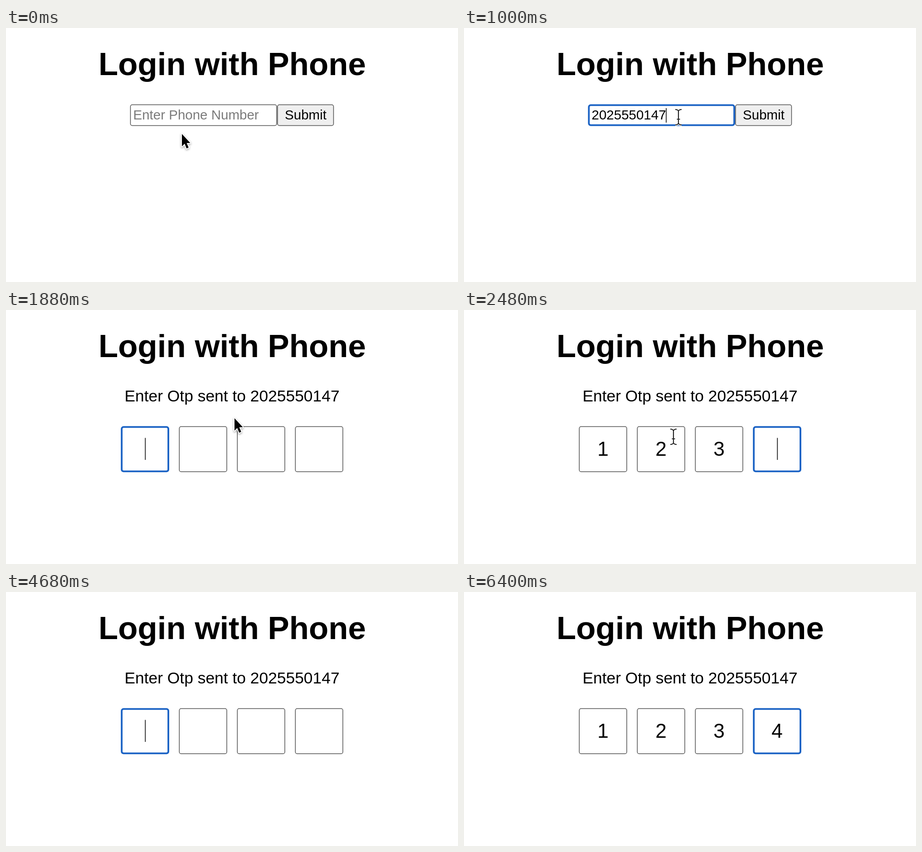
An HTML page with a canvas for the animation above (6560 ms loop, 997 px wide and 561 px high).

```html
<!DOCTYPE html>
<html lang="en">
<head>
<meta charset="utf-8">
<title>Login with Phone</title>
<style>
  html, body { margin: 0; width: 100%; height: 100%; overflow: hidden; background: #fff; }
  canvas { display: block; }
</style>
</head>
<body>
<canvas id="stage" width="997" height="561"></canvas>
<script>
const ctx = document.getElementById('stage').getContext('2d');
const LOOP = 6560, STEP = 40, BLINK = 480;
const PHONE = '2025550147', CODE = '1234';
const FOCUS = '#1a62c4', EDGE = '#505050';

const CLICK_FIELD = 280, TYPE_START = 400, TYPE_END = 880;
const PRESS = 1320, SEND = 1440;

// [time, number of code digits entered]
const entries = [
  [SEND, 0], [2120, 1], [2280, 2], [2440, 3], [2880, 4],
  [4160, 3], [4320, 2], [4520, 1], [4680, 0],
  [5320, 1], [5520, 2], [5720, 3], [5880, 4]
];

// [time, x, y] of the pointer's hot spot
const path = [
  [0, 388, 234], [280, 408, 198], [880, 418, 198], [1000, 473, 197],
  [1280, 656, 194], [1440, 656, 194], [1880, 504, 239], [2200, 470, 268],
  [2480, 462, 280], [2720, 490, 296], [3120, 539.5, 313]
];

const boxX = i => 254.3 + i * 128;
const blinkOn = (t, since) => Math.floor((t - since) / BLINK) % 2 === 0;

function text(str, x, y, size, { color = '#000', align = 'center', weight = 'normal' } = {}) {
  ctx.font = `${weight} ${size}px "Liberation Sans", Arial, sans-serif`;
  ctx.fillStyle = color;
  ctx.textAlign = align;
  ctx.fillText(str, x, y);
}

function frame(x, y, w, h, { fill = '#fff', color = EDGE, line = 1.5, radius = 4 } = {}) {
  ctx.beginPath();
  ctx.roundRect(x, y, w, h, radius);
  ctx.fillStyle = fill;
  ctx.fill();
  ctx.strokeStyle = color;
  ctx.lineWidth = line;
  ctx.stroke();
}

function field(x, y, w, h, focused) {
  if (focused) frame(x + 0.9, y + 0.9, w - 1.8, h - 1.8, { color: FOCUS, line: 3.8 });
  else frame(x, y, w, h);
}

function caret(x, top, height) {
  ctx.fillStyle = '#222';
  ctx.fillRect(x - 0.9, top, 1.8, height);
}

function phoneForm(t) {
  const focused = t >= CLICK_FIELD;
  const progress = (t - TYPE_START) / (TYPE_END - TYPE_START);
  const count = Math.max(0, Math.min(10, Math.floor(progress * 9) + 1));
  const pressed = t >= PRESS;

  frame(599, 169.5, 123.5, 46, { fill: pressed ? '#e0e0e0' : '#efefef' });
  text('Submit', 661, 202, 29.5);
  field(274.5, 169.5, 322.5, 46, focused);
  if (count) text(PHONE.slice(0, count), 281.5, 202, 29.5, { align: 'left' });
  else text('Enter Phone Number', 280.5, 202, 29.5, { color: '#7b7b7b', align: 'left' });

  const since = t < TYPE_START ? CLICK_FIELD : Math.min(t, TYPE_END);
  if (focused && blinkOn(t, since)) caret(281.5 + count * 16.45, 177, 32);
}

function codeForm(t) {
  const [since, count] = entries.filter(e => e[0] <= t).pop();
  const active = Math.min(count, 3);

  text('Enter Otp sent to ' + PHONE, 498.5, 202.3, 35.4);
  for (let i = 0; i < 4; i++) {
    field(boxX(i), 257.5, 104.7, 99.7, i === active);
    if (i < count) text(CODE[i], boxX(i) + 52.2, 322, 44.3);
  }
  if (blinkOn(t, since)) caret(boxX(active) + (count === 4 ? 64.7 : 53), 282.5, 48.5);
}

function pointerAt(t) {
  const next = path.findIndex(p => p[0] > t);
  if (next < 0) return path[path.length - 1].slice(1);
  const [t0, x0, y0] = path[next - 1], [t1, x1, y1] = path[next];
  const k = (t - t0) / (t1 - t0);
  const ease = k * k * (3 - 2 * k);
  return [x0 + (x1 - x0) * ease, y0 + (y1 - y0) * ease];
}

function overField(t, x, y) {
  if (t < SEND) return x > 274 && x < 598 && y > 169 && y < 216;
  return y > 257 && y < 358 && [0, 1, 2, 3].some(i => x > boxX(i) && x < boxX(i) + 105);
}

const arrow = new Path2D('M0 0V27.5L6 21.5L10.3 32L14.8 30L10.5 20H18.5Z');
const beam = new Path2D(
  'M-7-17Q-1-17 0-13Q1-17 7-17M0-13V13M-7 17Q-1 17 0 13Q1 17 7 17M-3.5 4.5H3.5');

function pointer(t) {
  const typing = t >= TYPE_START && t < TYPE_END;
  if (typing || t >= 4160) return;
  const [x, y] = pointerAt(t);
  ctx.save();
  ctx.translate(x, y);
  ctx.lineJoin = 'round';
  ctx.strokeStyle = '#fff';
  if (overField(t, x, y)) {
    ctx.lineWidth = 5;
    ctx.stroke(beam);
    ctx.strokeStyle = '#222';
    ctx.lineWidth = 2.2;
    ctx.stroke(beam);
  } else {
    ctx.shadowColor = 'rgba(0,0,0,.35)';
    ctx.shadowBlur = 4;
    ctx.shadowOffsetY = 2;
    ctx.lineWidth = 4;
    ctx.stroke(arrow);
    ctx.shadowColor = 'transparent';
    ctx.fillStyle = '#000';
    ctx.fill(arrow);
  }
  ctx.restore();
}

function draw(t) {
  ctx.fillStyle = '#fff';
  ctx.fillRect(0, 0, 997, 561);
  text('Login with Phone', 499, 103.6, 70.8, { weight: 'bold' });
  if (t < SEND) phoneForm(t);
  else codeForm(t);
  pointer(t);
}

const start = performance.now();
function tick() {
  const t = (performance.now() - start) % LOOP;
  draw(Math.floor(t / STEP) * STEP);
  requestAnimationFrame(tick);
}
tick();
</script>
</body>
</html>
```
